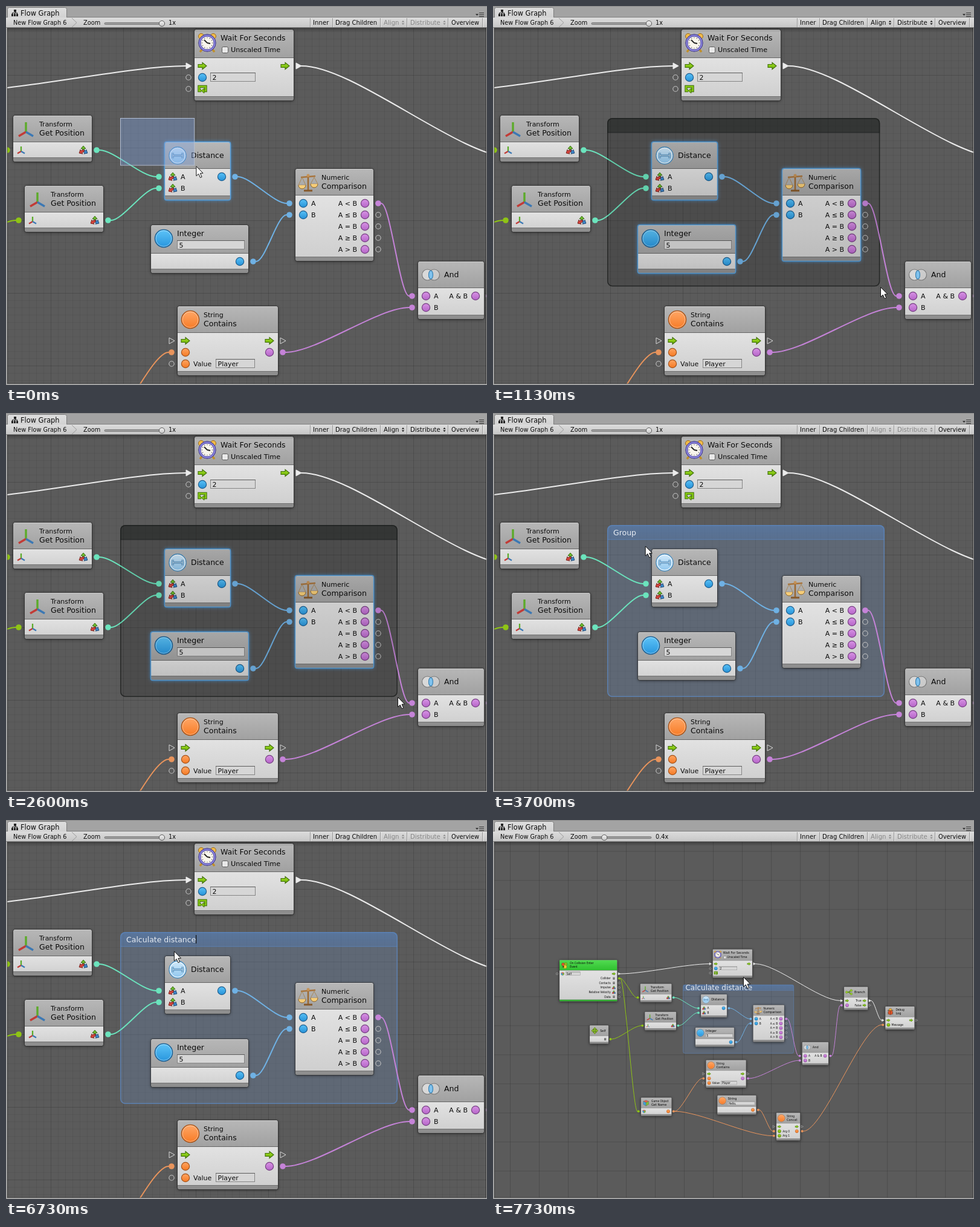
Animation of 796x626 px, one loop 8 s. Source, as an HTML page with a canvas:

```html
<!DOCTYPE html>
<html lang="en">
<head>
<meta charset="utf-8">
<title>Flow Graph</title>
<style>
html, body { margin: 0; width: 100%; height: 100%; overflow: hidden; background: #5b5b5b; }
canvas { display: block; width: 796px; height: 626px; }
</style>
</head>
<body>
<canvas id="stage" width="796" height="626"></canvas>
<script>
const ctx = document.getElementById('stage').getContext('2d');
const LOOP = 8000, CX = 398, CY = 330;
const WIRE = { e: '#ececec', n: '#6fb1e4', b: '#c583d8', s: '#e8945c', v: '#6be4bd', t: '#8fc415', o: '#8fc415' };

// ---------- drawing helpers ----------
function text(s, x, y, size, color = '#0a0a0a', align = 'left') {
  ctx.font = size + 'px "DejaVu Sans", sans-serif';
  ctx.textAlign = align;
  ctx.fillStyle = color;
  ctx.fillText(s, x, y);
}
function rect(x, y, w, h, fill) {
  ctx.fillStyle = fill;
  ctx.fillRect(x, y, w, h);
}
function grad(y0, y1, a, b) {
  const g = ctx.createLinearGradient(0, y0, 0, y1);
  g.addColorStop(0, a);
  g.addColorStop(1, b);
  return g;
}
function paint(fill, stroke, width = 1) {
  if (fill) { ctx.fillStyle = fill; ctx.fill(); }
  if (stroke) { ctx.strokeStyle = stroke; ctx.lineWidth = width; ctx.stroke(); }
}
function disc(x, y, r, fill, stroke, width) {
  ctx.beginPath();
  ctx.arc(x, y, r, 0, Math.PI * 2);
  paint(fill, stroke, width);
}
function poly(points, fill, stroke, width) {
  ctx.beginPath();
  for (let i = 0; i < points.length; i += 2) ctx.lineTo(points[i], points[i + 1]);
  ctx.closePath();
  paint(fill, stroke, width);
}
function line(x0, y0, x1, y1, color, width = 1) {
  ctx.beginPath();
  ctx.moveTo(x0, y0);
  ctx.lineTo(x1, y1);
  paint(null, color, width);
}
function box(x, y, w, h, r) {
  ctx.beginPath();
  ctx.roundRect(x, y, w, h, r);
}
function at(x, y, scale, draw) {
  ctx.save();
  ctx.translate(x, y);
  ctx.scale(scale, scale);
  draw();
  ctx.restore();
}
function field(x, y, w, value) {
  rect(x, y, w, 15, '#d6d6d6');
  ctx.strokeStyle = '#858585';
  ctx.lineWidth = 1;
  ctx.strokeRect(x + .5, y + .5, w - 1, 14);
  line(x, y + .5, x + w, y + .5, '#5c5c5c');
  text(value, x + 3.5, y + 12, 11);
}

// ---------- icons, drawn around 0,0 ----------
function ball(r, light, dark, edge) {
  disc(0, 0, r, grad(-r, r, light, dark), edge, r > 10 ? 1.4 : 1.2);
  if (r > 10) disc(0, 0, r - 1.6, null, 'rgba(255,255,255,.4)', 1);
}
function axes(width) {
  line(0, 2, 0, -14, '#5cab2a', width);
  line(0, 2, -12, 9, '#c23b36', width);
  line(0, 2, 12, 9, '#3b78b4', width);
}
function cube() {
  poly([0, -9, 9, -5, 0, -1, -9, -5], '#e9624a', '#555', .7);
  poly([-9, -5, 0, -1, 0, 10, -9, 5], '#42a0d8', '#555', .7);
  poly([9, -5, 0, -1, 0, 10, 9, 5], '#7dbb37', '#555', .7);
}
function arrowUp(color, edge) {
  poly([0, -8, 4, -3.5, 1.7, -3.5, 1.7, 1, -1.7, 1, -1.7, -3.5, -4, -3.5], color, edge, .8);
}
const portIcons = {
  e() { poly([-7, -2.5, 0, -2.5, 0, -5.5, 7, 0, 0, 5.5, 0, 2.5, -7, 2.5], grad(-5, 5, '#a6e22c', '#69ad00'), '#3e6d08', 1.1); },
  r() {
    ctx.beginPath();
    ctx.moveTo(-2, 3); ctx.lineTo(-5.5, 3); ctx.lineTo(-5.5, -4); ctx.lineTo(5.5, -4); ctx.lineTo(5.5, 3); ctx.lineTo(3, 3);
    paint(null, '#3e6d08', 4.4);
    paint(null, '#86c914', 2.4);
    poly([-2, 3, 3, -1, 3, 7], '#86c914', '#3e6d08', .9);
  },
  n() { ball(6.6, '#58c0f6', '#2792d8', '#1f5f90'); },
  b() { ball(6.6, '#d792e4', '#b565c8', '#764083'); },
  s() { ball(6.6, '#ffa562', '#f57a24', '#a4541c'); },
  o() { ball(6.6, '#a2d52d', '#75ad0b', '#4c7010'); },
  g() { rect(-4, -5, 8, 10, '#6e6e6e'); rect(-2, -3, 4, 2, '#b5b5b5'); },
  c() { ctx.scale(.7, .7); cube(); },
  t() { ctx.translate(0, 1); ctx.scale(.5, .5); axes(4.6); },
  v() {
    ctx.translate(0, 1);
    const tints = [['#6cbb2c', '#2e5c0c'], ['#3c86cc', '#1b446c'], ['#d8443c', '#701d18']];
    for (const [fill, edge] of tints) {
      arrowUp(fill, edge);
      ctx.rotate(Math.PI * 2 / 3);
    }
  }
};
const headIcons = {
  clock() {
    for (const s of [-1, 1]) {
      disc(10 * s, -11, 4.5, '#f0bb4a', '#9a6a1a');
      line(9 * s, 11, 12 * s, 15, '#c08f2a', 3.4);
    }
    disc(0, 0, 14.2, '#5d55b8', '#3f3888', 1);
    disc(0, 0, 12.6, null, '#9a94e6', 1.4);
    disc(0, 0, 10.8, '#f8f5ec', '#6d66b4', .8);
    for (let i = 0; i < 12; i++) {
      const a = i * Math.PI / 6;
      disc(8.6 * Math.sin(a), 8.6 * Math.cos(a), .7, '#555');
    }
    line(0, 0, -5, -5, '#222', 1.8);
    line(0, 0, 5, 1, '#222', 1.8);
  },
  axes() { ctx.translate(0, 3); axes(3.4); },
  cube() { ctx.scale(1.25, 1.25); cube(); },
  dist() {
    disc(0, 0, 14, grad(-14, 14, '#d3eafa', '#8dc5ed'), '#3b86bd', 1.3);
    disc(0, 0, 12.6, null, '#f2f9fd', 1.2);
    for (const [color, width] of [['#2f74ab', 3], ['#e9f4fb', 1]]) {
      line(-8, 0, 8, 0, color, width);
      for (const x of [-8, 8]) line(x, -4.5, x, 4.5, color, width);
    }
  },
  int() { ball(14.6, '#5ec4f8', '#2795dd', '#1f5f90'); },
  str() { ball(14.6, '#ffa767', '#f77b26', '#a4541c'); },
  scale() {
    line(0, -13, 0, 13, '#9c6a33', 2.6);
    line(-12, -8, 12, -10, '#a8743c', 2.4);
    disc(0, -11, 2.5, '#c49257');
    line(-7, 14, 7, 14, '#86592a', 3);
    for (const [x, y] of [[-10, 5], [10, 3]]) {
      poly([x, -8, x - 6, y, x + 6, y], null, '#a88350', .9);
      ctx.beginPath();
      ctx.arc(x, y, 6, 0, Math.PI);
      paint('#f6cd78', '#8d6528', 1);
    }
  },
  and() {
    disc(-5.5, 0, 9, 'rgba(225,225,225,.85)', '#7b7b7b', 1.2);
    disc(5.5, 0, 9, 'rgba(225,225,225,.6)', '#7b7b7b', 1.2);
    ctx.beginPath();
    ctx.ellipse(0, 0, 3.5, 7, 0, 0, Math.PI * 2);
    paint('#7fc2ee', '#3982b4', 1.2);
  },
  hit() {
    disc(-6, -4, 6, '#e4552f', '#6d260f');
    disc(5, -5, 6, '#8fbf1f', '#47650a');
    disc(2, 6, 7, '#f5c92f', '#84670c');
    rect(-8, 3, 6, 6, '#3d3d22');
  },
  self() {
    ctx.scale(1.7, 1.7);
    for (let i = 0; i < 4; i++) {
      ctx.rotate(Math.PI / 2);
      arrowUp('#8bbf2a', '#47650a');
    }
    disc(0, 0, 1.8, '#8bbf2a');
  },
  branch() {
    line(-11, 0, -2, 0, '#5d8c10', 4);
    line(-2, 0, 9, -7, '#5d8c10', 4);
    line(-2, 0, 9, 7, '#5d8c10', 4);
    for (const [x, y] of [[-10, 0], [9, -7], [9, 7]]) disc(x, y, 4.5, '#9bd22e', '#4c7010');
  },
  bug() {
    for (const y of [-6, 1, 8]) line(-12, y, 12, y, '#4b2b19', 2);
    disc(0, -8, 6, '#f0b43a', '#61330e');
    disc(0, 3, 9, '#e4572c', '#61230e');
    line(0, -5, 0, 12, '#61230e', 1.5);
  }
};

// ---------- graph: ports are [type, label, field text, field width] ----------
const nodes = {
  hit: { x: -322, y: 83, w: 238, icon: 'hit', sub: 'On Collision Enter', title: 'Event', green: true,
    ins: [['c', '', 'Self', 60]],
    outs: [['e'], ['g', 'Collider'], ['g', 'Contacts'], ['v', 'Impulse'], ['v', 'Relative Velocity'], ['g', 'Data']] },
  self: { x: -197, y: 353, w: 77, icon: 'self', title: 'Self', ins: [], outs: [['g']] },
  wait: { x: 312, y: 39, w: 163, hd: 46, icon: 'clock', title: 'Wait For Seconds', check: 'Unscaled Time',
    ins: [['e'], ['n', '', '2', 75], ['r']], outs: [['e']] },
  pos1: { x: 12, y: 181, w: 129, icon: 'axes', sub: 'Transform', title: 'Get Position', ins: [['t']], outs: [['v']] },
  pos2: { x: 31, y: 297, w: 129, icon: 'axes', sub: 'Transform', title: 'Get Position', ins: [['t']], outs: [['v']] },
  dist: { x: 263, y: 225, w: 107, icon: 'dist', title: 'Distance', ins: [['v', 'A'], ['v', 'B']], outs: [['n']] },
  int: { x: 240, y: 362, w: 160, hd: 46, icon: 'int', title: 'Integer', value: '5', ins: [], outs: [['n']] },
  cmp: { x: 479, y: 269, w: 128, icon: 'scale', sub: 'Numeric', title: 'Comparison', ins: [['n', 'A'], ['n', 'B']],
    outs: ['<', '≤', '=', '≥', '>'].map(s => ['b', `A ${s} B`]) },
  and: { x: 682, y: 422, w: 108, icon: 'and', title: 'And', ins: [['b', 'A'], ['b', 'B']], outs: [['b', 'A & B']] },
  has: { x: 284, y: 496, w: 165, icon: 'str', sub: 'String', title: 'Contains',
    ins: [['e'], ['s'], ['s', 'Value', 'Player', 65]], outs: [['e'], ['b']] },
  name: { x: 15, y: 651, w: 126, icon: 'cube', sub: 'Game Object', title: 'Get Name', ins: [['c']], outs: [['s']] },
  hello: { x: 331, y: 642, w: 160, hd: 46, icon: 'str', title: 'String', value: 'Hello, ', ins: [], outs: [['s']] },
  cat: { x: 575, y: 714, w: 98, icon: 'str', sub: 'String', title: 'Concat',
    ins: [['e'], ['o', 'Arg 0'], ['o', 'Arg 1']], outs: [['e'], ['s']] },
  branch: { x: 855, y: 194, w: 98, icon: 'branch', title: 'Branch', ins: [['e'], ['b']], outs: [['e', 'True'], ['e', 'False']] },
  log: { x: 1026, y: 275, w: 120, icon: 'bug', sub: 'Debug', title: 'Log', ins: [['e'], ['o', 'Message']], outs: [['e']] }
};
const wires = [
  ['hit', 0, 'wait', 0, 'e'], ['hit', 1, 'pos1', 0, 'o'], ['hit', 1, 'name', 0, 'o'], ['self', 0, 'pos2', 0, 'o'],
  ['pos1', 0, 'dist', 0, 'v'], ['pos2', 0, 'dist', 1, 'v'], ['dist', 0, 'cmp', 0, 'n'], ['int', 0, 'cmp', 1, 'n'],
  ['cmp', 0, 'and', 0, 'b'], ['has', 1, 'and', 1, 'b'], ['and', 0, 'branch', 1, 'b'], ['wait', 0, 'branch', 0, 'e'],
  ['branch', 0, 'log', 0, 'e'], ['name', 0, 'has', 1, 's'], ['name', 0, 'cat', 2, 's'], ['hello', 0, 'cat', 1, 's'],
  ['cat', 1, 'log', 1, 's']
];
for (const n of Object.values(nodes)) {
  n.hd = n.hd || 43;
  n.h = n.hd + 19 * Math.max(n.ins.length, n.outs.length) + 14;
}
for (const [a, i, b, j, type] of wires) {
  nodes[a].outs[i].link = WIRE[type];
  nodes[b].ins[j].link = WIRE[type];
}
const rowY = (n, i) => n.y + n.hd + 14 + 19 * i;

// Wires run between the outer edges of the port handles.
function drawWire([a, i, b, j, type], zoom) {
  const x0 = nodes[a].x + nodes[a].w + 14, y0 = rowY(nodes[a], i);
  const x1 = nodes[b].x - 15, y1 = rowY(nodes[b], j);
  const bend = Math.max(15, Math.abs(x1 - x0) / 4);
  ctx.beginPath();
  ctx.moveTo(x0 - 4, y0);
  ctx.lineTo(x0, y0);
  ctx.bezierCurveTo(x0 + bend, y0, x1 - bend, y1, x1, y1);
  ctx.lineTo(x1 + 4, y1);
  paint(null, WIRE[type], Math.max(2, 1 / zoom));
}
function drawPort(port, x, y) {
  if (port[0] === 'e') poly([x - 4, y - 5, x + 5, y, x - 4, y + 5], port.link, port.link || '#d6d6d6', 1);
  else if (port.link) disc(x, y, 4.8, port.link);
  else disc(x, y, 4.2, null, '#c4c4c4', 1.1);
}
function drawNode(n, selected) {
  const { x, y, w, h, hd } = n;
  ctx.save();
  ctx.shadowColor = selected ? '#3f9cf0' : 'rgba(0,0,0,.6)';
  ctx.shadowBlur = selected ? 6 : 5;
  ctx.shadowOffsetY = selected ? 0 : 1;
  box(x, y, w + 1, h, 3);
  paint('#8b8b8b');
  ctx.restore();

  ctx.save();
  ctx.clip();
  rect(x, y, w + 1, hd, n.green ? grad(y, y + hd, '#52dc52', '#2fc02f') : grad(y, y + hd, '#b7b7b7', '#a1a1a1'));
  rect(x, y + hd, w + 1, h - hd - 7, grad(y + hd, y + h, '#e2e2e2', '#cecece'));
  rect(x, y + h - 7, w + 1, 7, n.green ? '#2cb52c' : '#8e8e8e');
  line(x, y + .5, x + w, y + .5, 'rgba(255,255,255,.3)');
  line(x, y + hd + .5, x + w + 1, y + hd + .5, '#666');
  line(x, y + h - 6.5, x + w + 1, y + h - 6.5, '#727272');
  ctx.restore();
  box(x - .5, y - .5, w + 2, h + 1, 3);
  paint(null, selected ? '#559fdc' : 'rgba(45,45,45,.55)', selected ? 1.4 : 1);

  at(x + 21, y + 22, 1, headIcons[n.icon]);
  const tx = x + 43;
  if (n.sub) {
    text(n.sub, tx, y + 18, 11);
    text(n.title, tx, y + 33, n.green ? 11 : 12.5);
  } else text(n.title, tx, y + (n.hd > 43 ? 18 : 26), 12.5);
  if (n.value) field(tx, y + 25, w - 48, n.value);
  if (n.check) {
    box(x + 45.5, y + 28.5, 10, 10, 2);
    paint('#e8e8e8', '#5b5b5b');
    text(n.check, x + 60, y + 37, 11.2);
  }

  n.ins.forEach((p, i) => {
    const py = rowY(n, i);
    drawPort(p, x - 10, py);
    at(x + 13, py, 1, portIcons[p[0]]);
    if (p[1]) text(p[1], x + 26, py + 4, 11);
    if (p[2]) field(x + (p[1] ? 63 : 26), py - 8, p[3], p[2]);
  });
  n.outs.forEach((p, i) => {
    const py = rowY(n, i);
    drawPort(p, x + w + 9, py);
    at(x + w - 13, py, 1, portIcons[p[0]]);
    if (p[1]) text(p[1], x + w - 26, py + 4, 11, '#0a0a0a', 'right');
  });
}

const GRID_X = 314.5, GRID_Y = 114.5;
function drawGrid(zoom) {
  const minor = Math.min(1, Math.max(0, (zoom - .45) / .45)) * .06;
  const x0 = CX - 400 / zoom, x1 = CX + 400 / zoom, y0 = CY - 300 / zoom, y1 = CY + 300 / zoom;
  const rule = (i, ...ends) => {
    const alpha = i % 10 ? minor : .15;
    if (alpha) line(...ends, `rgba(0,0,0,${alpha})`, 1 / zoom);
  };
  for (let i = Math.floor((x0 - GRID_X) / 12), x; (x = GRID_X + i * 12) < x1; i++) rule(i, x, y0, x, y1);
  for (let i = Math.floor((y0 - GRID_Y) / 12), y; (y = GRID_Y + i * 12) < y1; i++) rule(i, x0, y, x1, y);
}

// ---------- timeline ----------
// Pointer track: time, x, y, eased
const track = [
  [-30, 302, 258], [0, 314, 264], [670, 580, 407], [830, 614, 436], [1130, 641, 464], [1570, 650, 473],
  [1830, 650, 473], [2200, 645, 466], [2600, 648, 469], [3100, 648, 469], [3830, 216, 197, 1],
  [6530, 216, 197], [7070, 414, 259, 1], [LOOP, 414, 259]
];
function pointer(t) {
  const i = track.findIndex(k => k[0] > t);
  const a = track[i - 1], b = track[i];
  let u = (t - a[0]) / (b[0] - a[0]);
  if (b[3]) u = u * u * (3 - 2 * u);
  return [a[1] + (b[1] - a[1]) * u, a[2] + (b[2] - a[2]) * u];
}
const GROUP_AT = 850, DROP_AT = 2870, EDIT_AT = 3930, TYPE_AT = 4300, BLUR_AT = 6900;
const TITLE = 'Calculate distance';
function typed(t) {
  if (t >= 6130) return TITLE.length;
  if (t >= 5430) return Math.min(16, 11 + Math.floor((t - 5430) / 100));
  if (t >= 4730) return Math.min(10, 4 + Math.floor((t - 4730) / 90));
  return Math.min(3, 1 + Math.floor((t - TYPE_AT) / 115));
}
function zoomAt(t) {
  const steps = [[7730, .4], [7670, .5], [7615, .7], [7560, .8], [7500, .9]];
  const step = steps.find(s => t >= s[0]);
  return step ? step[1] : 1;
}

const GX = 189, GY = 185, BAR = 24;
function panel(w, h, fill, bar, edge) {
  ctx.save();
  box(GX, GY, w, h, 8);
  paint(fill);
  ctx.clip();
  rect(GX, GY, w, BAR, bar);
  line(GX, GY + BAR, GX + w, GY + BAR, edge, 1.2);
  ctx.restore();
  box(GX + .75, GY + .75, w - 1.5, h - 1.5, 8);
  paint(null, edge, 1.5);
}
function drawGroup(t, zoom) {
  panel(459, 284, 'rgba(103,128,168,.34)',
    grad(GY, GY + BAR, 'rgba(84,130,192,.52)', 'rgba(82,122,178,.42)'), 'rgba(92,134,190,.8)');
  const size = (zoom === 1 ? 12.5 : 12) / zoom;
  const label = t < TYPE_AT ? 'Group' : TITLE.slice(0, typed(t));
  const x = GX + 10, y = GY + 12 + size * .37;
  if (t >= EDIT_AT && t < TYPE_AT) rect(x, GY + 5, 39, 16, 'rgba(62,125,231,.75)');
  text(label, x, y, size, '#e6ebf2');
  if (t >= TYPE_AT && t < BLUR_AT)
    rect(Math.round(x + ctx.measureText(label).width), GY + 5, 1.2, 14, '#111');
}

function drawBars(zoom, canAlign) {
  rect(0, 0, 796, 19, '#a3a3a3');
  rect(0, 0, 796, 1, '#8a8a8a');
  box(2.5, 2.5, 98, 20, [3, 3, 0, 0]);
  paint(grad(3, 19, '#dedede', '#d2d2d2'), '#7b7b7b');
  rect(0, 19, 796, 17, grad(19, 36, '#dcdcdc', '#c6c6c6'));
  rect(0, 18, 2, 1, '#808080');
  rect(101, 18, 695, 1, '#808080');
  rect(0, 35, 796, 1, '#7d7d7d');
  // hierarchy icon
  rect(13, 6, 4, 4, '#222');
  for (const x of [9, 13, 17]) { rect(x, 13, 3, 4, '#222'); rect(x + 1, 11, 1, 2, '#222'); }
  rect(10, 11, 9, 1, '#222');
  rect(15, 10, 1, 1, '#222');
  text('Flow Graph', 24, 16, 11.4);
  poly([777, 13, 782, 13, 779.5, 16], '#333');
  for (const y of [11, 14, 17]) rect(783, y, 8, 1, '#333');

  text('New Flow Graph 6', 12, 31, 9.7);
  ctx.beginPath();
  ctx.moveTo(109, 20);
  ctx.lineTo(117, 27.5);
  ctx.lineTo(109, 35);
  paint(null, '#9a9a9a');
  text('Zoom', 128, 31, 9.8);
  box(163, 27.5, 99, 3, 1.5);
  paint('#9d9d9d', '#6d6d6d', .8);
  disc(258 - (1 - zoom) * 123, 29, 4.6, grad(24, 34, '#f4f4f4', '#c4c4c4'), '#5a5a5a');
  text(zoom + 'x', 269, 31, 9.8);

  for (const x of [503, 540, 619, 663, 731, 788]) {
    rect(x, 20, 1, 15, '#949494');
    rect(x + 1, 20, 1, 15, '#e6e6e6');
  }
  const ink = canAlign ? '#0a0a0a' : '#878787';
  text('Inner', 508, 31, 10.2);
  text('Drag Children', 545, 31, 10);
  text('Align', 625, 31, 10.2, ink);
  text('Distribute', 669, 31, 10.1, ink);
  text('Overview', 737, 31, 9.8);
  for (const x of [657, 725.5]) {
    poly([x - 2.2, 26.5, x + 2.2, 26.5, x, 24], ink);
    poly([x - 2.2, 28.5, x + 2.2, 28.5, x, 31], ink);
  }
}
function drawPointer(t) {
  const [x, y] = pointer(t);
  if (t > 3100 && y < GY + BAR) {
    for (const [c, w] of [['rgba(60,60,60,.45)', 2.4], ['#e6b09c', 1.2]]) {
      line(x + .5, y - 6, x + .5, y + 7, c, w);
      line(x - 2, y - 6.5, x + 3, y - 6.5, c, w);
      line(x - 2, y + 7.5, x + 3, y + 7.5, c, w);
    }
    return;
  }
  at(x + .5, y + .5, 1, () =>
    poly([0, 0, 0, 16, 3.8, 12.6, 6.6, 18.8, 9.2, 17.6, 6.5, 11.6, 11.2, 11.4], '#fff', '#111', 1));
}

function draw(t) {
  const zoom = zoomAt(t);
  const selecting = t < GROUP_AT, grouping = !selecting && t < DROP_AT;
  const [rx, ry] = pointer(Math.min(t, DROP_AT) - 8);
  const w = rx - GX, h = ry - GY;
  const picked = ['dist', 'int', 'cmp'].filter(k =>
    grouping || selecting && rx > nodes[k].x && ry > nodes[k].y);

  rect(0, 0, 796, 626, '#a3a3a3');
  ctx.save();
  ctx.beginPath();
  ctx.rect(2, 36, 793, 588);
  ctx.clip();
  rect(0, 36, 796, 590, '#5b5b5b');
  ctx.translate(CX, CY);
  ctx.scale(zoom, zoom);
  ctx.translate(-CX, -CY);
  drawGrid(zoom);
  if (grouping) panel(w, h, 'rgba(0,0,0,.08)', 'rgba(30,34,32,.5)', 'rgba(25,28,27,.7)');
  if (t >= DROP_AT) drawGroup(t, zoom);
  wires.forEach(wire => drawWire(wire, zoom));
  for (const k in nodes) drawNode(nodes[k], picked.includes(k));
  if (grouping) {
    box(GX, GY, w, h, 8);
    paint('rgba(0,0,0,.09)');
  }
  if (selecting) {
    rect(GX, GY, w, h, 'rgba(126,160,220,.4)');
    ctx.strokeStyle = '#b3c0d6';
    ctx.lineWidth = 1;
    ctx.strokeRect(GX + .5, GY + .5, w, h);
  }
  ctx.restore();

  rect(2, 36, 793, 7, grad(36, 43, 'rgba(0,0,0,.3)', 'rgba(0,0,0,0)'));
  rect(2, 36, 1, 588, 'rgba(0,0,0,.3)');
  rect(794, 36, 1, 588, 'rgba(0,0,0,.3)');
  rect(2, 623, 793, 1, 'rgba(0,0,0,.3)');
  drawBars(zoom, picked.length > 1);
  drawPointer(t);
}

const start = performance.now();
function tick() {
  draw((performance.now() - start) % LOOP);
  requestAnimationFrame(tick);
}
tick();
</script>
</body>
</html>
```
